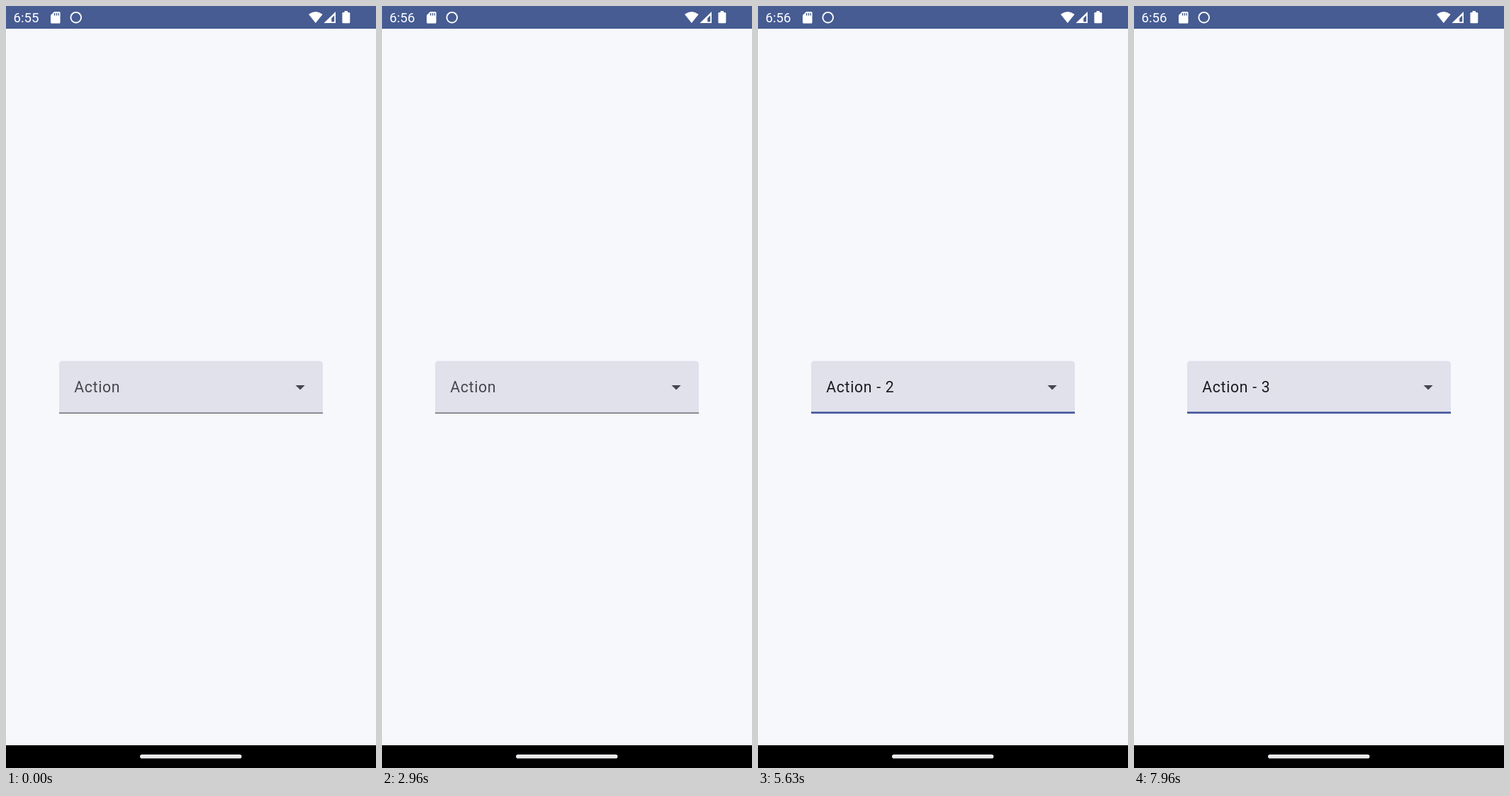
Animation, 522 px wide and 1073 px high, one loop 8000 ms. Source, as an HTML page:

```html
<!DOCTYPE html>
<html lang="en">
<head>
<meta charset="utf-8">
<title>Dropdown menu</title>
<style>
  html, body { margin: 0; width: 100%; height: 100%; overflow: hidden; background: #f6f8fc; }
  svg { display: block; width: 522px; height: 1073px; }
  text { font-family: Roboto, sans-serif; font-size: 18.6px; }

  .status { fill: #fff; }
  .field text { font-size: 21.26px; letter-spacing: .664px; fill: #1b1b1f; }
  .field .label { fill: #46464f; }
  .menu text { font-weight: 500; letter-spacing: .133px; fill: #1b1b1f; }
  .panel { fill: #e5eaf2; filter: drop-shadow(0 2.5px 2.5px rgba(0, 0, 0, .27)); }

  .before, .after, .label, .second, .third, .arrow { animation: 8s step-end infinite; }
  .before { animation-name: before; }
  .after { animation-name: after; }
  .label { animation-name: label; }
  .second { animation-name: second; }
  .third { animation-name: third; }
  .arrow { animation-name: flip; transform-origin: 415.1px 536.8px; }
  .line { animation: focus 8s linear infinite; transform-origin: 0 574px; }
  .menu { animation: fade 8s linear infinite, grow 8s infinite; transform-origin: 261px 574px; }

  @keyframes before { 0% { opacity: 1 } 3.75%, 100% { opacity: 0 } }
  @keyframes after { 0% { opacity: 0 } 3.75%, 100% { opacity: 1 } }
  @keyframes label { 0% { opacity: 1 } 65.5%, 100% { opacity: 0 } }
  @keyframes second { 0% { opacity: 0 } 65.5% { opacity: 1 } 93%, 100% { opacity: 0 } }
  @keyframes third { 0% { opacity: 0 } 93%, 100% { opacity: 1 } }
  @keyframes flip {
    0%, 65.5%, 93%, 100% { transform: none }
    44%, 79% { transform: rotate(180deg) }
  }
  @keyframes focus {
    0%, 44% { transform: scaleY(.5); fill: #46464f }
    45.875%, 100% { transform: none; fill: #465a9c }
  }
  @keyframes fade {
    0%, 44%, 66.44%, 79%, 93.94%, 100% { opacity: 0 }
    44.375%, 65.5%, 79.375%, 93% { opacity: 1 }
  }
  @keyframes grow {
    0%, 44% { transform: scale(.8); animation-timing-function: cubic-bezier(0, 0, .2, 1) }
    45.5%, 66.44% { transform: none; animation-timing-function: step-end }
    66.45%, 79% { transform: scale(.8); animation-timing-function: cubic-bezier(0, 0, .2, 1) }
    80.5%, 100% { transform: none }
  }
</style>
</head>
<body>
<svg viewBox="0 0 522 1073">
  <rect width="522" height="1073" fill="#f6f8fc"/>

  <rect width="522" height="32" fill="#465c92"/>
  <g class="status">
    <text class="before" x="10.5" y="23">6:55</text>
    <text class="after" x="10.5" y="23">6:56</text>
    <path d="M68 8h7q1.500 0 1.500 1.500v13.500q0 1.500-1.500 1.500h-10.500q-1.500 0-1.500-1.500v-10z"/>
    <path d="M68.500 10v3.500M71.300 10v3.500M74 10v3.500" stroke="#465c92" stroke-width="1.300"/>
    <circle cx="98.700" cy="16.200" r="7.300" fill="none" stroke="#fff" stroke-width="1.900"/>
    <path d="M436.800 24 427 11.800q9.800-7.400 19.600 0z"/>
    <path fill-rule="evenodd" d="M465 8v16h-16.500zM463.200 13.200l-4 4v5h4z"/>
    <path d="M477.500 7h4.500v2h2q1.300 0 1.300 1.300v12.700q0 1.300-1.300 1.300h-8.300q-1.300 0-1.300-1.300v-12.700q0-1.300 1.300-1.300h1.800z"/>
  </g>

  <g class="field">
    <path d="M75 574v-69q0-5.300 5.300-5.300h361.400q5.300 0 5.300 5.300v69z" fill="#e0e1eb"/>
    <rect class="line" x="75" y="571.300" width="372" height="2.700"/>
    <text class="label" x="96.300" y="544">Action</text>
    <text class="second" x="96.300" y="544">Action - 2</text>
    <text class="third" x="96.300" y="544">Action - 3</text>
    <path class="arrow" d="M408.500 533.900h13.200l-6.600 6.600z" fill="#46464f"/>
  </g>

  <g class="menu">
    <rect class="panel" x="75" y="574" width="372" height="340" rx="5.300"/>
    <text x="91" y="623">Action - 1</text>
    <text x="91" y="686.800">Action - 2</text>
    <text x="91" y="750.600">Action - 3</text>
    <text x="91" y="814.300">Action - 4</text>
    <text x="91" y="878.100">Action - 5</text>
  </g>

  <rect y="1041" width="522" height="32"/>
  <rect x="189" y="1054" width="143.500" height="5.600" rx="2.800" fill="#ebebef"/>
</svg>
</body>
</html>
```
